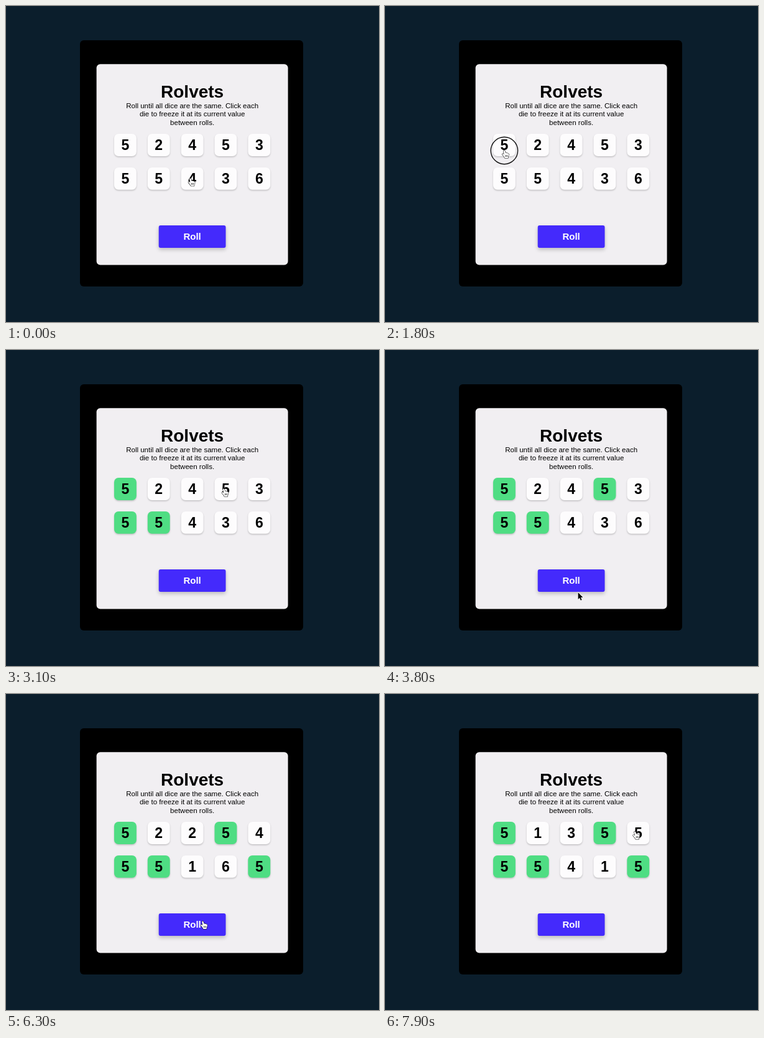
An HTML page with a canvas for the animation above (8000 ms loop, 600x507 px).

```html
<!DOCTYPE html>
<html lang="en">
<head>
<meta charset="utf-8">
<title>Dice game</title>
<style>
  html, body { margin: 0; width: 100%; height: 100%; overflow: hidden; background: #0b1e2c; }
  canvas { display: block; width: 600px; height: 507px; }
</style>
</head>
<body>
<canvas id="stage"></canvas>
<script>
const W = 600, H = 507, LOOP = 8000, STEP = 100;
const FONT = '"Liberation Sans", Arial, sans-serif';
const canvas = document.getElementById('stage');
const ctx = canvas.getContext('2d');
const dpr = window.devicePixelRatio || 1;
canvas.width = W * dpr;
canvas.height = H * dpr;

// Layout: everything is centred on CX
const CX = 299.6, DIE = 35.9, PITCH = 53.85;
const centred = (cx, cy, w, h) => ({ cx, cy, x: cx - w / 2, y: cy - h / 2, w, h });
const panel = centred(CX, 254.4, 308, 322.2);
const button = centred(CX, 370, 107.8, DIE);
const dice = Array.from({ length: 10 }, (_, i) =>
  centred(CX + (i % 5 - 2) * PITCH, 223 + Math.floor(i / 5) * PITCH, DIE, DIE));

// The pointer travels to each stop, rests there and may press
const TRAVEL = 500, REST = 200, PRESS = 100;
const hover = (at, spot, dx = -3, dy = 0) => ({ at, spot, x: spot.cx + dx, y: spot.cy + dy });
const press = (...args) => ({ ...hover(...args), pressed: true });
const stops = [
  hover(0, dice[7]),
  hover(900, button, 6, -9),
  press(1700, dice[0], 0, 9),
  press(2100, dice[5]),
  press(2500, dice[6]),
  press(3100, dice[3]),
  hover(3800, button, 11, 19),
  press(4100, button, 2),
  press(4800, button, 2),
  press(5800, dice[9]),
  press(6300, button, 17, -5),
  press(6800, button, 2),
  hover(7900, dice[4], -5, -2)
];
const presses = stops.filter(s => s.pressed);

// Faces in the order they come up; each roll uses one per loose die
const faces = '5245355436' + '361243' + '224165' + '46236' + '13541';

function gameAt(t) {
  let next = 0;
  const game = dice.map(() => ({ face: faces[next++], held: false }));
  for (const { at, spot } of presses) {
    if (at + REST > t) break;
    if (spot === button) {
      for (const die of game) if (!die.held) die.face = faces[next++];
    } else {
      game[dice.indexOf(spot)].held = true;
    }
  }
  return game;
}

function pointerAt(t) {
  const i = stops.findIndex(s => s.at >= t);
  if (i < 1) return stops[i < 0 ? stops.length - 1 : 0];
  const a = stops[i - 1], b = stops[i];
  const start = Math.max(a.at + REST, b.at - TRAVEL);
  const u = Math.max(0, (t - start) / (b.at - start));
  const k = u * u * (3 - 2 * u);
  return { x: a.x + (b.x - a.x) * k, y: a.y + (b.y - a.y) * k };
}

const handShape = new Path2D(
  'M-1.5 1 C-1.7 -.8 .7 -1.1 1.1 .6 L2 4.2 C2.8 3.4 3.9 3.7 4.2 4.6' +
  ' C5 4 6 4.3 6.3 5.2 C7.3 4.8 8 5.5 8 6.5 C8 9 7.3 10 6.8 11.2 L6.7 13.2' +
  ' L.8 13.2 C.5 11.4 -1.5 9.6 -3.5 7.2 C-4.2 6 -2.9 5.1 -1.8 5.9 L-.4 7 Z');
const arrowShape = new Path2D('M0 0 L0 11 L2.5 8.8 L4.2 12.7 L6 11.9 L4.4 8.1 L7.8 7.9 Z');

function box({ x, y, w, h }, r, fill, shadow) {
  ctx.save();
  if (shadow) {
    const [alpha, drop, blur] = shadow;
    ctx.shadowColor = `rgba(0,0,0,${alpha})`;
    ctx.shadowOffsetY = drop * dpr;
    ctx.shadowBlur = blur * dpr;
  }
  ctx.fillStyle = fill;
  ctx.beginPath();
  ctx.roundRect(x, y, w, h, r);
  ctx.fill();
  ctx.restore();
}

function label(text, x, y, font, color = '#000') {
  ctx.font = `${font} ${FONT}`;
  ctx.fillStyle = color;
  ctx.fillText(text, x, y);
}

const inside = (p, b) => Math.abs(p.x - b.cx) <= b.w / 2 && Math.abs(p.y - b.cy) <= b.h / 2;

function drawPointer(p) {
  const hand = [button, ...dice].some(b => inside(p, b));
  const shape = hand ? handShape : arrowShape;
  ctx.save();
  ctx.translate(p.x, p.y);
  if (hand) ctx.scale(0.9, 0.9);
  ctx.lineJoin = 'round';
  ctx.fillStyle = hand ? '#fff' : '#000';
  ctx.strokeStyle = hand ? '#000' : '#fff';
  ctx.lineWidth = hand ? 1.2 : 1.6;
  ctx.stroke(shape);
  ctx.fill(shape);
  if (hand) {
    ctx.lineWidth = 0.7;
    ctx.beginPath();
    for (let x = 2; x < 6; x += 1.7) {
      ctx.moveTo(x, 8);
      ctx.lineTo(x, 11);
    }
    ctx.stroke();
  }
  ctx.restore();
}

function drawRing({ x, y }) {
  ctx.strokeStyle = '#111';
  ctx.lineWidth = 1.4;
  ctx.beginPath();
  ctx.arc(x, y, 21.7, 0, Math.PI * 2);
  ctx.stroke();
}

function draw(t) {
  ctx.setTransform(dpr, 0, 0, dpr, 0, 0);
  ctx.fillStyle = '#0b1e2c';
  ctx.fillRect(0, 0, W, H);
  box({ x: 119, y: 55, w: 359, h: 395 }, 6, '#000');
  box(panel, 6, '#f1eff2');

  ctx.textAlign = 'center';
  label('Rolvets', CX, 146.7, 'bold 28px');
  ['Roll until all dice are the same. Click each',
   'die to freeze it at its current value',
   'between rolls.'].forEach((s, i) => label(s, CX, 164 + i * 13.3, '11.5px'));

  gameAt(t).forEach(({ face, held }, i) => {
    const die = dice[i];
    box(die, 7, held ? '#4fdd83' : '#fdfcfd', [0.2, 1.5, 2.5]);
    label(face, die.cx, die.cy + 8, 'bold 23px');
  });

  box(button, 3, '#442afc', [0.22, 3, 6]);
  label('Roll', CX, 375.3, 'bold 15px', '#fff');

  const hit = presses.find(s => t >= s.at + PRESS && t < s.at + REST);
  if (hit) drawRing(hit);
  drawPointer(pointerAt(t));
}

// The picture moves in tenths of a second
const begin = performance.now();
function tick() {
  const t = (performance.now() - begin) % LOOP;
  draw(Math.floor(t / STEP) * STEP);
  requestAnimationFrame(tick);
}
tick();
</script>
</body>
</html>
```
